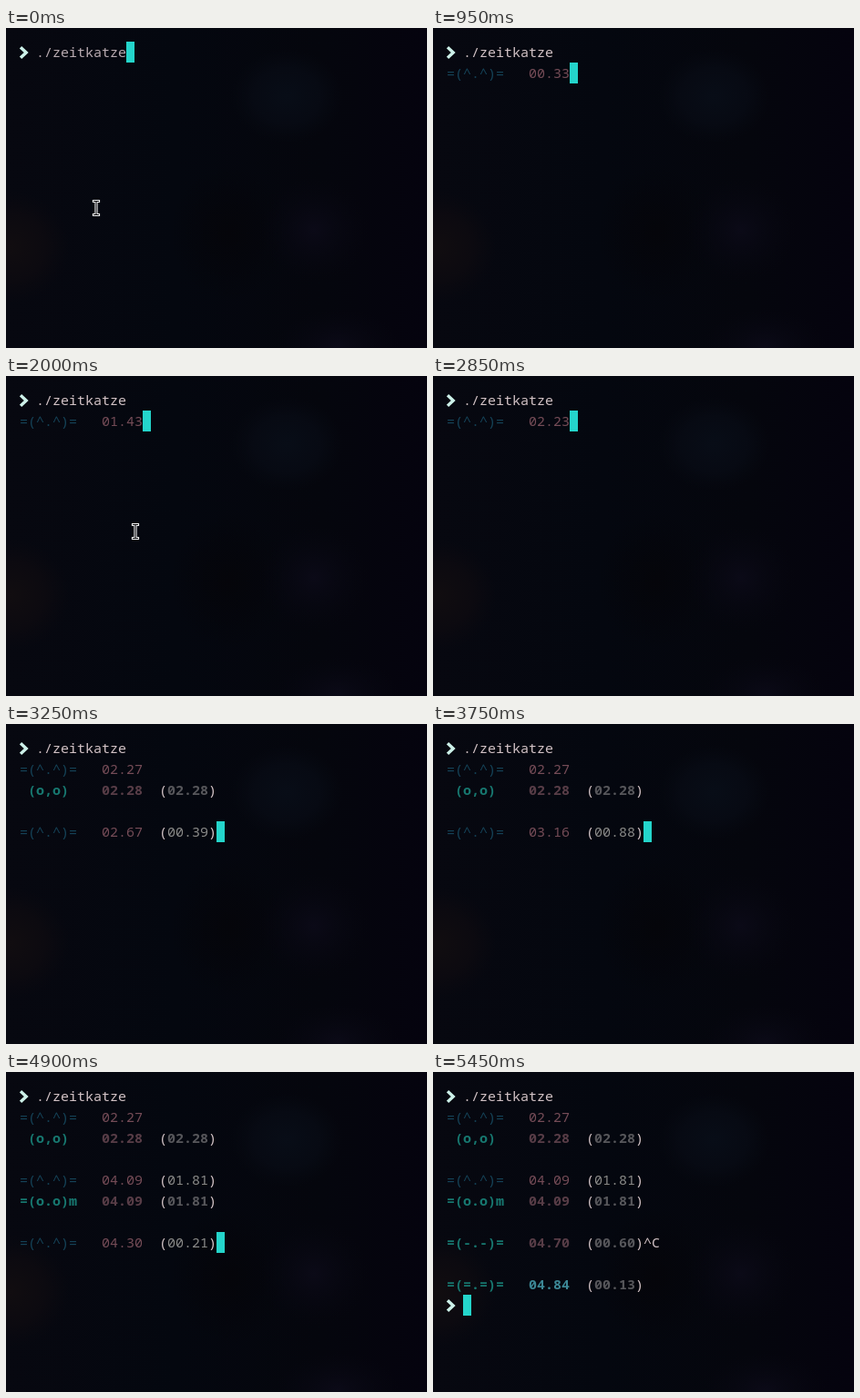
An HTML page for the animation above (6000 ms loop, 462 px wide and 352 px high).

```html
<!DOCTYPE html>
<html lang="en">
<head>
<meta charset="utf-8">
<title>Terminal stopwatch</title>
<style>
html, body { margin: 0; width: 100%; height: 100%; overflow: hidden; background: #05060f; }
svg { display: block; width: 462px; height: 352px; }
text { font: 15px "Noto Sans Mono", "DejaVu Sans Mono", monospace; font-variant-ligatures: none; white-space: pre; }
.bold { font-weight: 700; }
.plain { fill: #d3c3c6; }
.face { fill: #154358; }
.face.bold { fill: #177870; }
.time { fill: #754c57; }
.time.bold { fill: #583d47; }
.time.total { fill: #3c8795; }
.lap { fill: #8b8b89; }
.lap.bold { fill: #57575b; }
.prompt { fill: none; stroke: #cdf1e9; stroke-width: 3.4; }
.beam { fill: none; stroke-linecap: square; }
</style>
</head>
<body>
<svg viewBox="0 0 462 352">
  <defs>
    <linearGradient id="night">
      <stop offset="0" stop-color="#070810"/>
      <stop offset=".4" stop-color="#04070f"/>
      <stop offset=".75" stop-color="#05060d"/>
      <stop offset="1" stop-color="#05030e"/>
    </linearGradient>
    <radialGradient id="brown"><stop offset="0" stop-color="#110d10"/><stop offset=".6" stop-color="#0c0a10"/><stop offset="1" stop-color="#0a0910" stop-opacity="0"/></radialGradient>
    <radialGradient id="blue"><stop offset="0" stop-color="#080d17"/><stop offset=".6" stop-color="#070a13"/><stop offset="1" stop-color="#060911" stop-opacity="0"/></radialGradient>
    <radialGradient id="violet"><stop offset="0" stop-color="#0b0a17"/><stop offset="1" stop-color="#070711" stop-opacity="0"/></radialGradient>
    <radialGradient id="shade"><stop offset="0" stop-color="#05050a"/><stop offset="1" stop-color="#05050a" stop-opacity="0"/></radialGradient>
  </defs>
  <rect width="462" height="352" fill="url(#night)"/>
  <ellipse cx="245" cy="225" rx="65" ry="75" fill="url(#shade)"/>
  <ellipse cx="4" cy="241" rx="66" ry="62" fill="url(#brown)"/>
  <ellipse cx="308" cy="75" rx="62" ry="52" fill="url(#blue)"/>
  <ellipse cx="338" cy="222" rx="60" ry="58" fill="url(#violet)"/>
  <ellipse cx="364" cy="350" rx="68" ry="42" fill="url(#violet)"/>
  <g id="screen"></g>
  <rect id="caret" width="9" height="23" fill="#24d5cb"/>
  <g id="mouse" class="beam">
    <path d="M-2.5-7.5h5M0-7.5v15M-2.5 7.5h5" stroke="#f2f2f2" stroke-width="3.2"/>
    <path d="M-2.5-7.5h5M0-7.5v15M-2.5 7.5h5" stroke="#08080c" stroke-width="1.1"/>
  </g>
</svg>
<script>
const LOOP = 6000, TICK = 50;
const START = 550, LAP1 = 2900, LAP2 = 4750, STOP = 5300, EXIT = 5450;
const screen = document.getElementById("screen");
const caret = document.getElementById("caret");
const mouse = document.getElementById("mouse");

const colX = col => 15 + 9 * col;
const rowY = row => 15 + 23 * row;

function add(parent, tag, attrs) {
  const node = document.createElementNS(screen.namespaceURI, tag);
  for (const key in attrs) node.setAttribute(key, attrs[key]);
  return parent.appendChild(node);
}

function write(parent, col, text, style) {
  const node = add(parent, "text", { x: colX(col), y: 17, class: style });
  node.textContent = text;
  return node;
}

const addRow = row => add(screen, "g", { transform: `translate(0 ${rowY(row)})` });
const show = (node, on) => node.setAttribute("visibility", on ? "visible" : "hidden");

function addPrompt(row) {
  const line = addRow(row);
  add(line, "path", { d: "M16 6.2l6.2 5.8-6.2 5.8", class: "prompt" });
  return line;
}

function addReading(row, face, time, lap, weight = "", total = "") {
  const line = addRow(row);
  write(line, face.length < 7 ? 1 : 0, face, `face ${weight}`);
  const timeText = write(line, 10, time, `time ${weight} ${total}`);
  const lapGroup = add(line, "g", {});
  write(lapGroup, 17, "(", "plain");
  const lapText = write(lapGroup, 18, lap, `lap ${weight}`);
  write(lapGroup, 23, ")", "plain");
  if (!lap) lapGroup.remove();
  return { line, timeText, lapText, lapGroup };
}

const command = write(addPrompt(0), 2, "./zeitkatze", "plain");
const history = [
  [LAP1, 1, "=(^.^)=", "02.27", ""],
  [LAP1, 2, "(o,o)", "02.28", "02.28", "bold"],
  [LAP2, 4, "=(^.^)=", "04.09", "01.81"],
  [LAP2, 5, "=(o.o)m", "04.09", "01.81", "bold"],
  [STOP, 7, "=(-.-)=", "04.70", "00.60", "bold"],
  [EXIT, 9, "=(=.=)=", "04.84", "00.13", "bold", "total"]
].map(([at, ...reading]) => ({ at, line: addReading(...reading).line }));

const interrupt = addRow(7);
write(interrupt, 24, "^C", "plain");
history.push({ at: EXIT, line: interrupt }, { at: EXIT, line: addPrompt(10) });

const live = addReading(1, "=(^.^)=", "00.00", "00.00");

// Linear interpolation through rows of [position, value, ...].
function along(points, at) {
  let i = 1;
  while (i < points.length - 1 && at > points[i][0]) i++;
  const [a, b] = [points[i - 1], points[i]];
  const k = (at - a[0]) / (b[0] - a[0]);
  return a.slice(1).map((v, j) => v + (b[j + 1] - v) * k);
}

// The recorded clock skips one tick in thirteen.
const clock = [[-20, 0.33], [0, 1.43], [15, 2.23], [32, 3.16], [53, 4.30]];
function elapsed(t) {
  const tick = t / TICK;
  const step = tick - 40 - Math.floor((tick - 28) / 13);
  return Math.max(0, along(clock, step)[0]);
}

const digits = s => Math.max(0, s).toFixed(2).padStart(5, "0");

const path = [[1100, 101, 203], [1250, 114, 209], [1500, 153, 196], [1900, 142, 171]];
function placeMouse(t) {
  const [x, y] = t < START ? [99, 198] : along(path, Math.min(1900, Math.max(1100, t)));
  mouse.setAttribute("transform", `translate(${Math.round(x)} ${Math.round(y)})`);
  show(mouse, t < START || (t >= 1100 && t < 2650));
}

function placeCaret(col, row) {
  caret.setAttribute("x", colX(col));
  caret.setAttribute("y", rowY(row));
}

function render(now) {
  const t = Math.floor((now % LOOP) / TICK) * TICK;
  const row = t < LAP1 ? 1 : t < LAP2 ? 4 : 7;
  const lapStart = row === 4 ? 2.28 : 4.09;
  const time = elapsed(t);

  command.style.fill = t < START ? "#b9abb1" : "";
  for (const { at, line } of history) show(line, t >= at);

  live.line.setAttribute("transform", `translate(0 ${rowY(row)})`);
  live.line.style.display = t >= START && t < STOP ? "" : "none";
  live.lapGroup.style.display = row > 1 ? "" : "none";
  live.timeText.textContent = digits(time);
  live.lapText.textContent = digits(time - lapStart);

  if (t < START) placeCaret(13, 0);
  else if (t >= EXIT) placeCaret(2, 10);
  else placeCaret(row > 1 ? 24 : 15, row);
  placeMouse(t);
}

const begin = performance.now();
function frame() {
  render(performance.now() - begin);
  requestAnimationFrame(frame);
}
frame();
</script>
</body>
</html>
```
